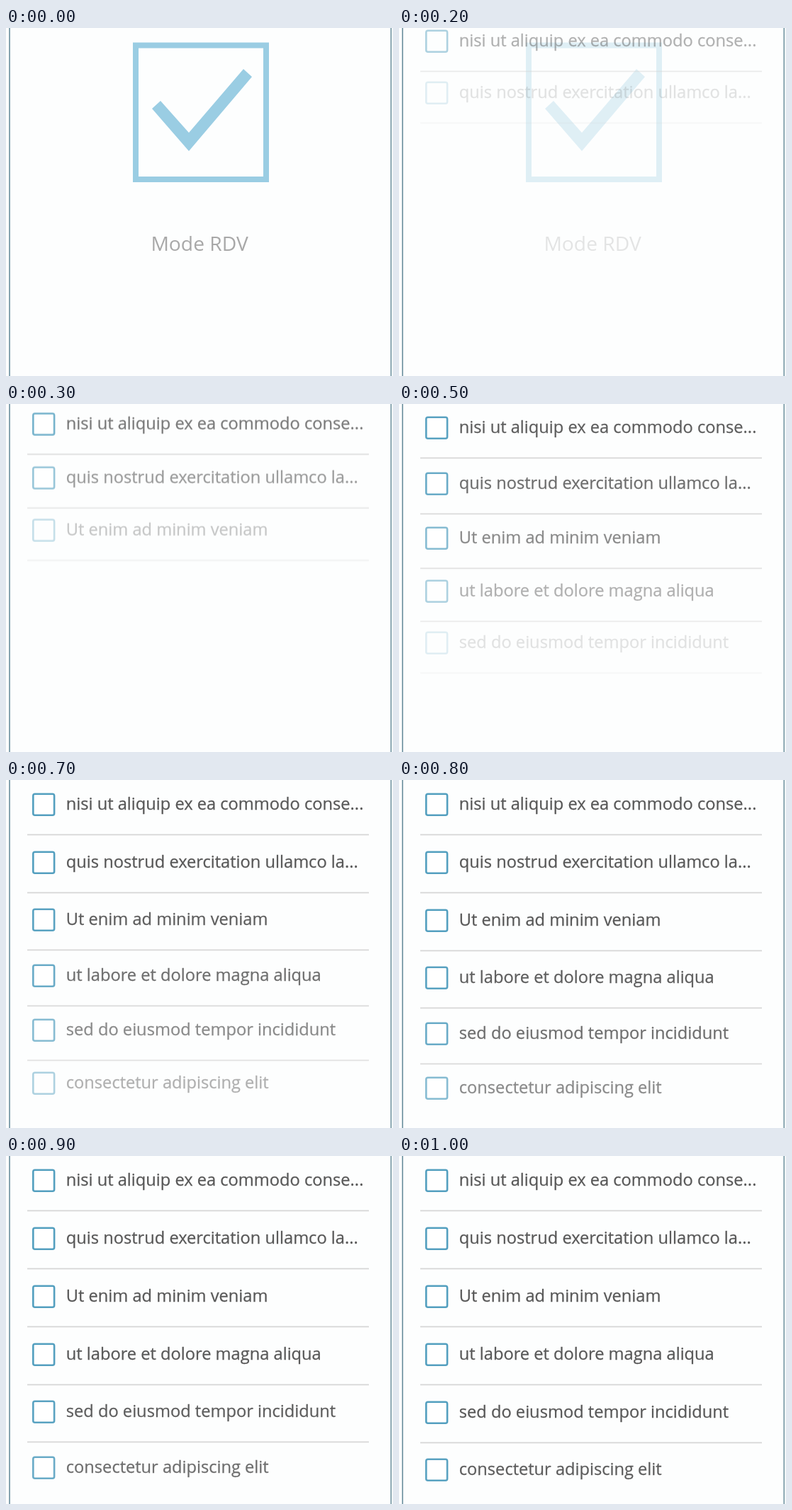
An HTML page that plays this animation: 546 by 492 pixels, repeating every 1100 ms.

```html
<!DOCTYPE html>
<html lang="la">
<head>
<meta charset="utf-8">
<title>Checklist transition</title>
<style>
  html, body { margin: 0; width: 100%; height: 100%; overflow: hidden; background: #fdfefe; }
  svg { display: block; width: 546px; height: 492px; }
  text { font-family: "Open Sans", "Noto Sans", sans-serif; }
  .item text { font-size: 23.65px; fill: #585858; stroke: #585858; stroke-width: .3; }
  .item rect { fill: #fff; stroke: #539fbf; stroke-width: 2.6; }
  .item line { stroke: #d6d6d6; stroke-width: 1.8; }
  .frame { stroke: #86a3af; stroke-width: 2; }
</style>
</head>
<body>
<svg viewBox="0 0 546 492">
  <path class="frame" d="M5 0V492M543.3 0V492"/>
  <g id="mode">
    <rect x="183" y="24.5" width="184" height="189.5" fill="none" stroke="#9acde3" stroke-width="8"/>
    <path d="M206 114L218 103L258 148L335 58L347 69L258 174Z" fill="#9acde3"/>
    <text x="204.4" y="315" font-size="28.2" fill="#a8a8a8">Mode RDV</text>
  </g>
  <g id="list"></g>
</svg>
<script>
const LOOP = 1100;
const TICKS = [0, 200, 300, 500, 600, 700, 800, 900, 1000, LOOP];
const PITCH = 82;
const FIRST = 150, STAGGER = 100, RISE = 500;
const NS = "http://www.w3.org/2000/svg";
const labels = [
  "nisi ut aliquip ex ea commodo conse...",
  "quis nostrud exercitation ullamco la...",
  "Ut enim ad minim veniam",
  "ut labore et dolore magna aliqua",
  "sed do eiusmod tempor incididunt",
  "consectetur adipiscing elit"
];

const clamp = v => Math.min(1, Math.max(0, v));

// A row slides down into place with a quadratic ease-out.
function rowPose(i, time) {
  const p = (time - FIRST - i * STAGGER) / RISE;
  const left = (1 - clamp(p)) ** 2;
  return { y: -25 * left, opacity: p < 0 ? 0 : 1 - .83 * left };
}

function modePose(time) {
  return { y: 0, opacity: clamp((280 - time) / 100) };
}

// Each pose is taken at the middle of its tick and held until the next one.
function play(el, pose) {
  const frames = TICKS.map((tick, n) => {
    const { y, opacity } = pose((tick + (TICKS[n + 1] ?? LOOP)) / 2);
    return { offset: tick / LOOP, transform: `translateY(${y}px)`, opacity, easing: "step-end" };
  });
  el.animate(frames, { duration: LOOP, iterations: Infinity });
}

function add(parent, tag, attrs, text = "") {
  const el = document.createElementNS(NS, tag);
  for (const key in attrs) el.setAttribute(key, attrs[key]);
  el.textContent = text;
  return parent.appendChild(el);
}

const list = document.getElementById("list");
labels.forEach((label, i) => {
  const row = add(list, "g", { class: "item" });
  const top = i * PITCH;
  add(row, "rect", { x: 38.3, y: top + 19.7, width: 29.8, height: 30, rx: 2.5 });
  add(row, "text", { x: 84.8, y: top + 41.7 }, label);
  if (i < labels.length - 1) add(row, "line", { x1: 30, x2: 512, y1: top + 77.3, y2: top + 77.3 });
  play(row, time => rowPose(i, time));
});

play(document.getElementById("mode"), modePose);
</script>
</body>
</html>
```
